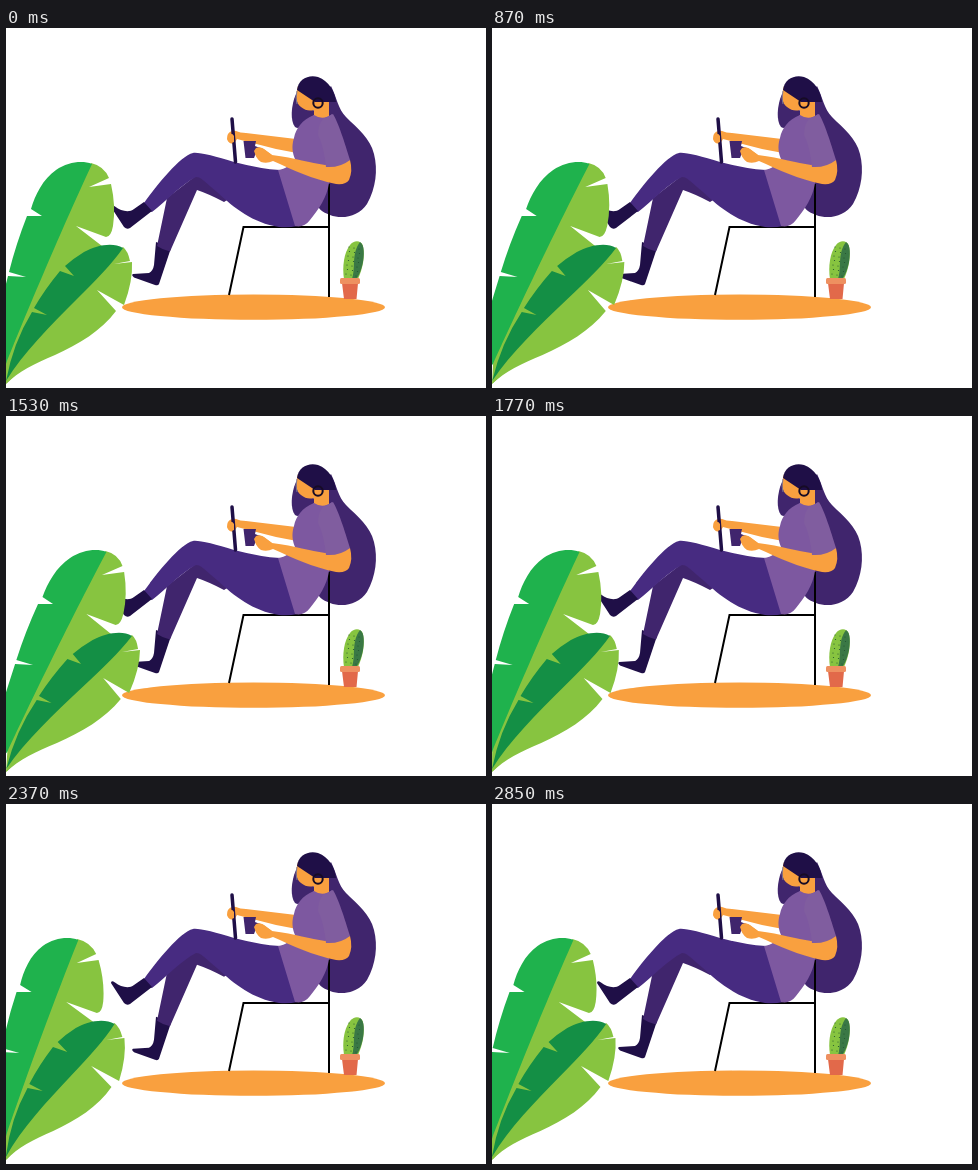
Write an HTML page that moves like this. It is 480 px wide and 360 px high and loops after 2880 ms.

```html
<!DOCTYPE html>
<html lang="en">
<head>
<meta charset="utf-8">
<title>Coffee break</title>
<style>
html, body { margin: 0; width: 100%; height: 100%; overflow: hidden; background: #fff; }
svg { display: block; width: 100vw; height: 100vh; }
.skin { fill: #f9a03f; }
.hair { fill: #40256d; }
.navy { fill: #1f0f47; }
.lime { fill: #87c440; }
</style>
</head>
<body>
<svg viewBox="0 0 480 360">
  <ellipse class="skin" cx="247.5" cy="279.2" rx="131.5" ry="12.6"/>

  <g id="cactus">
    <path class="lime" d="M338 251C336 238 338 225 344 217C348 212 355 212 357 218C359 228 357 240 352 251Z"/>
    <path fill="#3a7845" d="M354 214C359 217 358 228 357 234C355 243 353 247 351 250L346 251C350 240 345 226 354 214Z"/>
    <g id="spines" fill="#24532f"></g>
    <path fill="#e2694a" d="M336 255H352L350.500 271H338Z"/>
    <rect fill="#ee9060" x="334" y="250" width="20" height="6" rx="1.500"/>
  </g>

  <g id="woman">
    <path class="hair" d="M325 58C331 70 332 81 340 89C352 101 364 110 368 126C372 142 370 160 361 176C353 188 337 192 324 187C316 184 312 181 312 176L321 150L309 78Z"/>
    <path class="hair" d="M290 66C285 77 284 93 289 99C293 102 299 99 309 86L304 72Z"/>
    <path fill="none" stroke="#000" stroke-width="2" d="M323 156V269M323 199H237.500L223 267"/>
    <g id="backLeg">
      <path class="navy" d="M150 214L165 220L153 256Q152 258 149 257L128 249.500Q125 247 127 246L143 245Q147 243 148 237Z"/>
      <path class="hair" d="M192 146L161 170L151 218Q157 222 164 223.500L191 162Q203 166 218 174L240 160Z"/>
    </g>
    <path fill="#472b81" d="M187 125C192 124 209 128 228 134Q255 141 274 142L292 198Q282 200 273 199C247 195 228 180 211 164C202 157 196 149 190 149C176 156 160 173 146 184Q139 183 138 175C151 157 174 128 187 125Z"/>
    <path class="navy" d="M138 174L146 183L124 200Q121 202 118 199L105 179Q105 176 109 178.500C115 183 123 185 128 181Z"/>
    <path class="skin" d="M290 111L240 105Q234 105 230 103Q225 102 222 106Q220 111 224 115Q228 117 231 111L270 121L291 125Z"/>
    <path class="skin" d="M292 58C289 67 290 76 295 79Q301 84 308 82V91H323V66Z"/>
    <path fill="#7d58a0" d="M308 87C296 92 290 100 288 110C285 119 287 126 289 131C284 137 280 141 272 142L289 198Q298 200 304 192C313 181 321 169 323 155L332 120L326 86Q317 93 308 87Z"/>
    <path class="skin" d="M266 127C290 130 304 135 319 137L344 132Q347 143 343 152Q340 157 330 156C306 151 287 142 267 133Q261 136 255 134Q249 130 248 121Q253 118 258 121Z"/>
    <path fill="#805d9f" d="M327 86C332 94 339 115 344 132Q334 140 320 139Q318 119 312 107Q312 97 317 91Z"/>
    <path class="navy" d="M291 62C292 51 303 46 312 49C323 53 329 64 330 74H309Q300 68 291 62Z"/>
    <path fill="none" stroke="#7b7693" stroke-width="1" d="M291 63Q289 70 291 76"/>
    <circle fill="none" stroke="#160b25" stroke-width="2" cx="312" cy="75" r="4.700"/>
    <path fill="none" stroke="#1f0f47" stroke-width="3.500" stroke-linecap="round" d="M226 91L229.500 134"/>
    <path class="skin" d="M222 106Q227 105 228 108V114Q223 117 221 111Z"/>
    <path class="hair" d="M237.500 113H250L249 118L254 120L251 122L248 130H239.500Z"/>
    <path class="skin" d="M250 120Q255 118 259 122L266 127L258 134Q250 131 248 123Z"/>
  </g>

  <g id="leaves">
    <path class="lime" d="M85 135Q98 138 103 150L83 159L105 156Q110 178 107 198Q105 209 100 209L70 198L96 218L70 285L0 356V320Z"/>
    <path fill="#1fb24d" d="M86 136C76 132 62 134 50 142C37 151 29 167 25 181L36 188L21 188Q10 216 3 244L20 249L2 248L-24 350V358L0 336C15 298 53 207 86 136Z"/>
    <path class="lime" d="M117 219Q122 223 124 233L108 236L126 234Q127 253 118 277L91 262L110 283C95 303 73 316 49 327C28 336 13 343 0 356L30 295Z"/>
    <path fill="#148f45" d="M117 220C107 214 91 217 78 224Q68 230 59 238L68 248L54 243Q39 261 28 280L41 287L26 284Q7 315 0 353C17 325 45 297 70 272C90 252 106 236 117 220Z"/>
  </g>
</svg>
<script>
const LOOP = 2880, STEP = 30, GROUND = 356;
// Keys of [ms, px]. Sway is measured 169 px above the ground; its last swing is cut by the loop.
const SWAY = [[0, 0], [1400, 12.8], [2160, -11.5], [3260, 0]];
const LIFT = [[0, 0], [2000, 0], [2880, 3]];
const leaves = document.getElementById('leaves');
const backLeg = document.getElementById('backLeg');

function valueAt(keys, time) {
  const i = keys.findIndex(([end]) => end > time);
  const [t0, from] = keys[i - 1], [t1, to] = keys[i];
  const eased = (1 - Math.cos(Math.PI * (time - t0) / (t1 - t0))) / 2;
  return from + (to - from) * eased;
}

function addSpines() {
  let dots = '';
  for (let row = 0; row < 7; row++) {
    for (let col = 0; col < 3; col++) {
      const x = 340 + col * 5 + (6 - row) * 0.5 + (row % 2);
      dots += `<circle cx="${x}" cy="${246 - (6 - row) * 4.5 + col}" r="0.6"/>`;
    }
  }
  document.getElementById('spines').innerHTML = dots;
}

function draw(now) {
  const time = Math.floor((now % LOOP) / STEP) * STEP;
  const skew = valueAt(SWAY, time) / 169;
  leaves.setAttribute('transform', `matrix(1 0 ${-skew} 1 ${skew * GROUND} 0)`);
  backLeg.setAttribute('transform', `translate(0 ${-valueAt(LIFT, time)})`);
}

addSpines();
const start = performance.now();
draw(0);
requestAnimationFrame(function tick(now) {
  draw(Math.max(0, now - start));
  requestAnimationFrame(tick);
});
</script>
</body>
</html>
```
